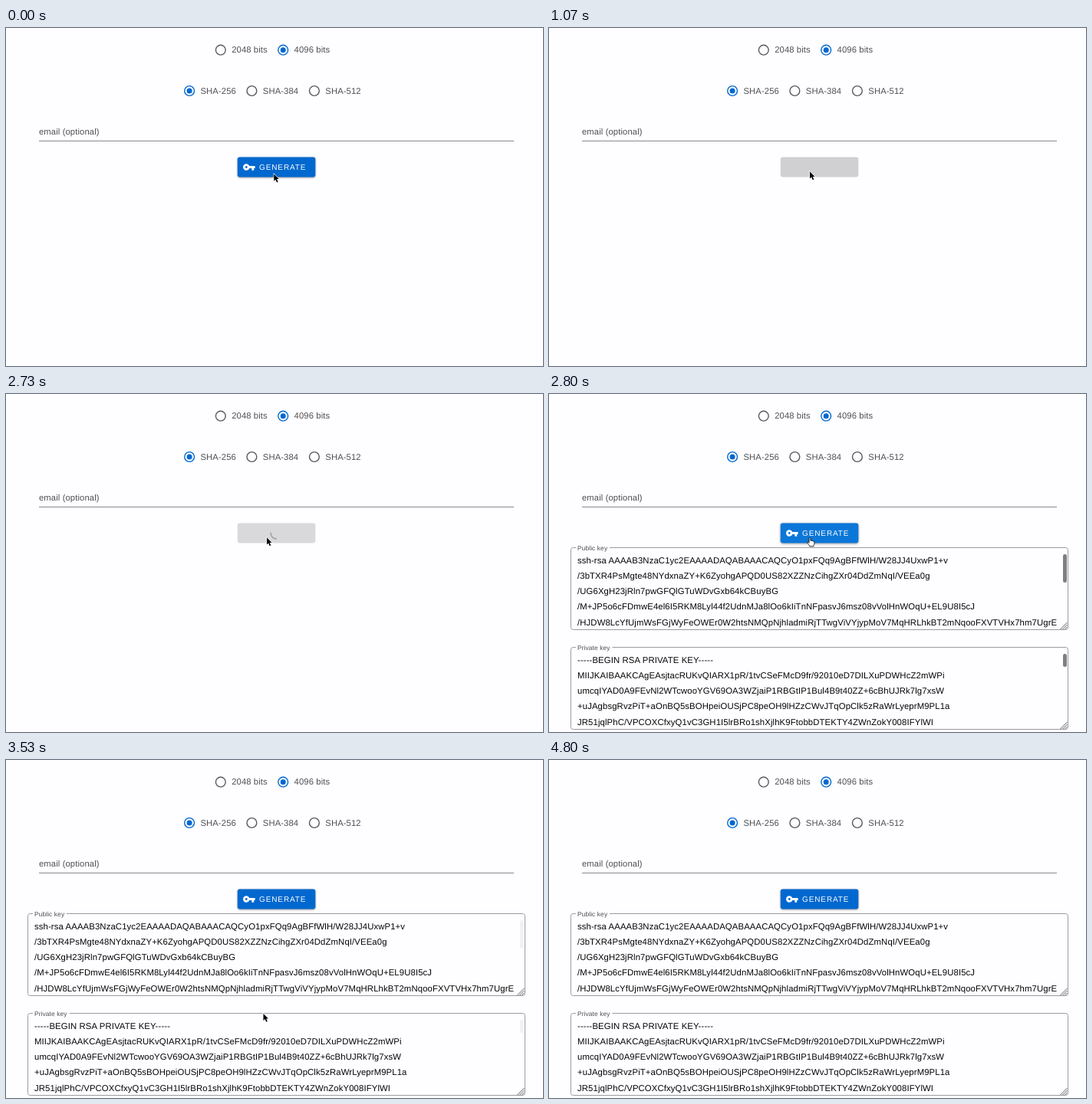
These frames come from a looping animation (700x441 px, 5140 ms). An HTML page:

```html
<!DOCTYPE html>
<html lang="en">
<head>
<meta charset="utf-8">
<title>Key generator</title>
<style>
  html, body { margin: 0; width: 100%; height: 100%; overflow: hidden; background: #fefdff; }
  svg { display: block; width: 700px; height: 441px; }
  text { font: 11.25px "Liberation Sans", Arial, sans-serif; letter-spacing: .009375em; fill: #4f4e51; white-space: pre; text-rendering: geometricPrecision; }
  .value { font-size: 11.35px; fill: #050506; }
  .small { font-size: 8.44px; }
  .caption { font-size: 10px; letter-spacing: .0892em; fill: #fff; }
  .ring { fill: none; stroke: #59585b; stroke-width: 1.4; }
  .on { stroke: #0068cf; }
  .dot { fill: #0068cf; }
  .outline { fill: none; stroke: #9b9a9d; }
  .grip { fill: none; stroke: #4a494c; stroke-width: .9; }
  .bar { fill: #7f7e82; }
</style>
</head>
<body>
<svg viewBox="0 0 700 441">
  <g id="form">
    <path d="M43 147.4H662" stroke="#858487"/>
    <text x="43" y="138.8">email (optional)</text>
  </g>
  <rect id="button" x="301.8" y="168.5" width="101.5" height="25.9" rx="2.8"/>
  <g id="caption">
    <path transform="translate(308.3 173) scale(.71)" fill="#fff" fill-rule="evenodd"
      d="M12.65 10A6 6 0 1 0 12.65 14H17V18H21V14H23V10ZM7 14A2 2 0 1 1 7 10A2 2 0 0 1 7 14Z"/>
    <text class="caption" x="330" y="185">GENERATE</text>
  </g>
  <circle id="spinner" cx="352.5" cy="181.6" r="7.4" fill="none" stroke="#9c9b9e" stroke-width="1.4"/>
  <g id="results"><g id="bars"></g></g>
  <g id="cursor">
    <path id="arrow" d="M0 0V9.2L2.1 7.2L3.7 10.9L5.3 10.2L3.7 6.6H6.5Z" stroke="#fff" stroke-width="1.2" paint-order="stroke"/>
    <path id="hand" fill="#fff" stroke="#111" stroke-width=".9" stroke-linejoin="round"
      d="M-1 1C-1-.2 .9-.2 .9 1V4.2C1.3 3.4 2.6 3.6 2.7 4.5C3.2 3.8 4.3 4.1 4.4 5C5 4.5 5.9 4.9 5.9 5.8V8C5.9 9.3 4.9 9.8 4.9 11.5H-.2C-.5 9.8-2.5 8.5-3.4 6.6C-3.7 5.6-2.3 5.3-1 7Z"/>
  </g>
</svg>
<script>
const LOOP = 5140, FPS = 15;
const CLICK = 1055, DONE = 2795, LEAVE = 3260, GONE = 3640;
const SPIN = 1400;
const BLUE = [0, 104, 207], HOVER = [11, 119, 216], PRESSED = [208, 207, 209], DISABLED = [217, 216, 218];
const $ = id => document.getElementById(id);

function add(parent, tag, attrs, content = '') {
  const node = document.createElementNS('http://www.w3.org/2000/svg', tag);
  for (const name in attrs) node.setAttribute(name, attrs[name]);
  node.textContent = content;
  parent.append(node);
}

function radio(cx, cy, label, checked) {
  const form = $('form');
  add(form, 'circle', { cx, cy, r: 6.4, class: checked ? 'ring on' : 'ring' });
  if (checked) add(form, 'circle', { cx, cy, r: 3.5, class: 'dot' });
  add(form, 'text', { x: cx + 14.4, y: cy + 3.7 }, label);
}

function field(y, label, gapEnd, barHeight, lines) {
  const results = $('results'), bottom = y + 107;
  add(results, 'path', {
    class: 'outline',
    d: `M35 ${y}H31.5a3 3 0 0 0-3 3V${bottom - 3}a3 3 0 0 0 3 3H673.5a3 3 0 0 0 3-3V${y + 3}a3 3 0 0 0-3-3H${gapEnd}`
  });
  add(results, 'text', { x: 37, y: y + 3.1, class: 'small' }, label);
  lines.forEach((line, i) => add(results, 'text', { x: 37, y: y + 20.3 + i * 20.2, class: 'value' }, line));
  add(results, 'path', { class: 'grip', d: `M666.5 ${bottom - .5}l9-9M669.5 ${bottom - .5}l6-6M672.5 ${bottom - .5}l3-3` });
  add($('bars'), 'rect', { x: 670, y: y + 8.5, width: 5, height: barHeight, rx: 2.5, class: 'bar' });
}

radio(279.8, 28.7, '2048 bits');
radio(361.2, 28.7, '4096 bits', true);
radio(239.1, 82, 'SHA-256', true);
radio(320.4, 82, 'SHA-384');
radio(401.9, 82, 'SHA-512');

field(200.5, 'Public key', 79, 37, [
  'ssh-rsa AAAAB3NzaC1yc2EAAAADAQABAAACAQCyO1pxFQq9AgBFfWlH/W28JJ4UxwP1+v',
  '/3bTXR4PsMgte48NYdxnaZY+K6ZyohgAPQD0US82XZZNzCihgZXr04DdZmNqI/VEEa0g',
  '/UG6XgH23jRln7pwGFQlGTuWDvGxb64kCBuyBG',
  '/M+JP5o6cFDmwE4el6I5RKM8Lyl44f2UdnMJa8lOo6kIiTnNFpasvJ6msz08vVolHnWOqU+EL9U8I5cJ',
  '/HJDW8LcYfUjmWsFGjWyFeOWEr0W2htsNMQpNjhladmiRjTTwgViVYjypMoV7MqHRLhkBT2mNqooFXVTVHx7hm7UgrE'
]);
field(330.5, 'Private key', 82.5, 17, [
  '-----BEGIN RSA PRIVATE KEY-----',
  'MIIJKAIBAAKCAgEAsjtacRUKvQIARX1pR/1tvCSeFMcD9fr/92010eD7DILXuPDWHcZ2mWPi',
  'umcqIYAD0A9FEvNl2WTcwooYGV69OA3WZjaiP1RBGtIP1Bul4B9t40ZZ+6cBhUJRk7lg7xsW',
  '+uJAgbsgRvzPiT+aOnBQ5sBOHpeiOUSjPC8peOH9lHZzCWvJTqOpClk5zRaWrLyeprM9PL1a',
  'JR51jqlPhC/VPCOXCfxyQ1vC3GH1I5lrBRo1shXjlhK9FtobbDTEKTY4ZWnZokY008IFYlWI'
]);

const ramp = (t, from, to) => Math.min(1, Math.max(0, (t - from) / (to - from)));
const smooth = s => s * s * (3 - 2 * s);
const mix = (a, b, s) => a + (b - a) * s;
const blend = (a, b, s) => `rgb(${a.map((v, i) => mix(v, b[i], s))})`;
const show = (id, visible) => $(id).style.display = visible ? '' : 'none';

function drawButton(t, loading) {
  const hover = ramp(t, 200, 450) * (1 - ramp(t, LEAVE, LEAVE + 250));
  const lift = 1 + hover * .4;
  $('button').setAttribute('fill', loading
    ? blend(PRESSED, DISABLED, ramp(t, CLICK, CLICK + 350))
    : blend(BLUE, HOVER, hover));
  $('button').style.filter = loading ? 'none'
    : `drop-shadow(0 ${lift}px ${lift}px rgba(0,0,0,.32)) drop-shadow(0 .7px ${1.2 * lift}px rgba(0,0,0,.12))`;
}

// Arc grows in the first half of a turn, then its tail catches up.
function drawSpinner(t) {
  const turn = (t - CLICK) % SPIN / SPIN;
  const grow = smooth(ramp(turn, 0, .5)), chase = smooth(ramp(turn, .5, 1));
  const start = (15 * grow + 110 * chase) / 126;
  const length = Math.min(mix(1, 100, grow) / 126, 1 - start);
  const round = 2 * Math.PI * 7.4;
  $('spinner').setAttribute('stroke-dasharray', `${length * round} 99`);
  $('spinner').setAttribute('transform', `rotate(${360 * (turn + start)} 352.5 181.6)`);
}

function drawCursor(t, loading) {
  const arrive = smooth(ramp(t, 70, 400)), leave = ramp(t, LEAVE - 50, GONE) ** 2;
  const x = mix(349.3, 340, arrive) - 8 * leave;
  const y = mix(190.5, 187.3, arrive) + 254 * leave;
  const pointing = !loading && t >= 200 && t < LEAVE;
  $('cursor').setAttribute('transform', `translate(${x} ${y})`);
  show('cursor', t < GONE);
  show('hand', pointing);
  show('arrow', !pointing);
}

function render(now) {
  const t = Math.floor((now % LOOP + 4) * FPS / 1000) * 1000 / FPS;
  const loading = t >= CLICK && t < DONE;
  drawButton(t, loading);
  drawCursor(t, loading);
  if (loading) drawSpinner(t);
  show('spinner', loading);
  show('caption', !loading);
  show('results', t >= DONE);
  $('bars').style.opacity = 1 - ramp(t, 3300, 3560);
}

const began = performance.now();
function tick() {
  render(performance.now() - began);
  requestAnimationFrame(tick);
}
tick();
</script>
</body>
</html>
```
